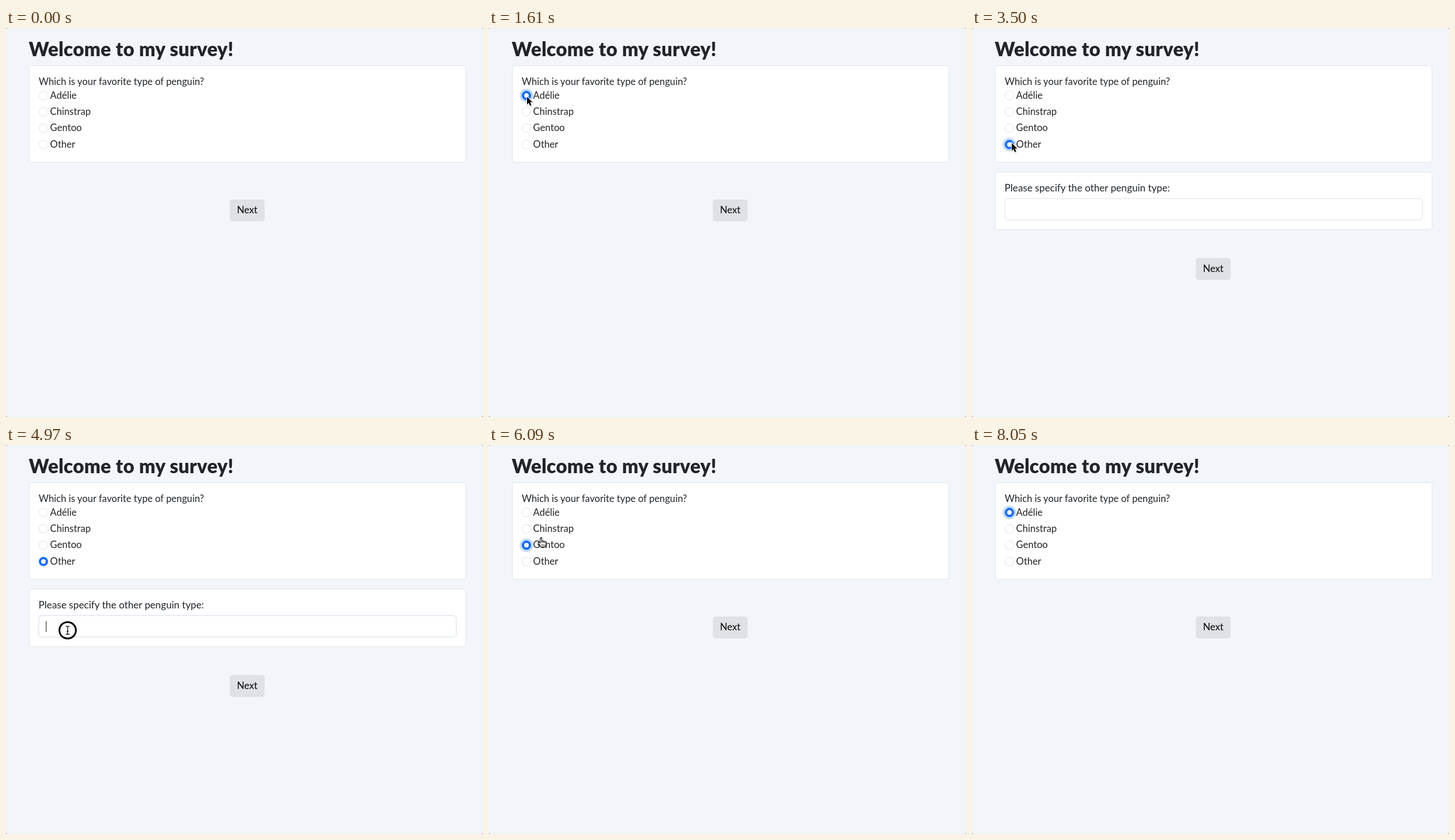
These frames come from a looping animation (828x676 px, 8.47 s). An HTML page:

```html
<!DOCTYPE html>
<html lang="en">
<head>
<meta charset="utf-8">
<title>Survey</title>
<style>
html, body { margin: 0; width: 100%; height: 100%; overflow: hidden; background: #f2f6fb; }
svg { display: block; width: 828px; height: 676px; }
text { font: 16.7px Lato, "Open Sans", sans-serif; fill: #212529; }
.title { font-size: 33.2px; font-weight: 900; letter-spacing: .3px; }
.box { fill: #fff; stroke: #dfe2e6; }
</style>
</head>
<body>
<svg viewBox="0 0 828 676">
  <rect width="828" height="676" fill="#f2f6fb"/>
  <path fill="#777" fill-rule="evenodd" d="M0 0H828V676H0ZM3 0Q0 0 0 3V673Q0 676 3 676H825Q828 676 828 673V3Q828 0 825 0Z"/>
  <text class="title" x="39.5" y="48.5">Welcome to my survey!</text>
  <rect class="box" x="40.5" y="65.5" width="758" height="168" rx="4"/>
  <text x="56.7" y="98.7">Which is your favorite type of penguin?</text>
  <g id="radios"></g>
  <g id="panel">
    <rect class="box" x="40.5" y="250.5" width="758" height="100" rx="4"/>
    <text x="56.5" y="284" style="font-size:17.2px">Please specify the other penguin type:</text>
    <rect id="glow" x="55" y="294.5" width="728.5" height="41" rx="7" fill="none" stroke="#c2dbfe" stroke-width="4"/>
    <rect class="box" x="57" y="296.5" width="724.5" height="37" rx="5"/>
    <rect id="edge" x="57" y="296.5" width="724.5" height="37" rx="5" fill="none" stroke="#86b7fe"/>
    <path id="caret" d="M69.7 306V325" stroke="#212529" stroke-width="1.1"/>
  </g>
  <g id="next">
    <rect x="388.5" y="298" width="60.5" height="38" rx="5" fill="#dee2e6"/>
    <text x="418.7" y="322" text-anchor="middle" style="fill:#000">Next</text>
  </g>
  <g id="pointer">
    <circle id="press" fill="none" stroke="#000" stroke-width="3"/>
    <g id="arrow">
      <path d="M0 1V14.5L3.2 11.6 5.4 16.6 8 15.5 5.8 10.6H10Z" opacity=".18" stroke="#000" stroke-width="2"/>
      <path d="M0 0V13.4L3 10.5 5.2 15.5 7.7 14.4 5.5 9.6H9.5Z" stroke="#fff" stroke-width="2" paint-order="stroke"/>
    </g>
    <g id="hand" fill="#fff" stroke="#000" stroke-width="1.2" stroke-linejoin="round">
      <path d="M-1.5 9V.9A1.4 1.4 0 0 1 1.3 .9V6Q2.8 4.4 4 6.3 5.6 5.2 6.6 7 9 6.2 9 8.7L8.6 12Q7.4 14 7.3 16H-.6Q-1.6 13-5 9.7-5.8 7.4-3.5 7.6Z"/>
      <path d="M1.3 6V9M4 6.5V9M6.6 7V9.4M1.2 11.2V14M3.4 11.2V14M5.6 11.2V14" stroke-width=".9"/>
    </g>
    <path id="beam" d="M-3.4-7.2Q-.4-7.2 0-5.4 .4-7.2 3.4-7.2M-3.4 7.2Q-.4 7.2 0 5.4 .4 7.2 3.4 7.2M0-5.4V5.4M-1.7 1.8H1.7" fill="none" stroke="#000" stroke-width="1.2"/>
  </g>
</svg>
<script>
const LOOP = 8470, STEP = 70, ENTER = 140, LEAVE = 8050;
const FADE = 210, GLOW = 150, LAG = 70;
const OTHER = 3, FIELD = "field";

const $ = id => document.getElementById(id);
const clamp = v => Math.max(0, Math.min(1, v));
const show = (el, on) => el.setAttribute("display", on ? "inline" : "none");
const out = power => u => 1 - (1 - u) ** power;
const smooth = u => u * u * (3 - 2 * u);

const origin = { x: 391, y: 593 };
const moves = [
  { from: ENTER, to: 1260, x: 66, y: 119.5, ease: out(3), bend: 36 },
  { from: 2450, to: 3010, x: 69, y: 200, ease: out(2) },
  { from: 3570, to: 4340, x: 88, y: 342, ease: smooth },
  { from: 4480, to: 4900, x: 107, y: 322, ease: out(2) },
  { from: 5180, to: 5530, x: 91, y: 173, ease: out(3) },
  { from: 5880, to: 6650, x: 88, y: 109, ease: smooth },
  { from: 7000, to: LEAVE, x: 450, y: 672, ease: out(2), bend: -85 }
];

const clicks = [
  { down: 1260, up: 1470, on: 0 },
  { down: 1750, up: 2030, on: 0 },
  { down: 3080, up: 3360, on: OTHER },
  { down: 4960, up: 5180, on: FIELD },
  { down: 5530, up: 5670, on: 2 },
  { down: 6580, up: 6790, on: 0 }
];
const typing = clicks.find(c => c.on === FIELD);
const blur = clicks[clicks.indexOf(typing) + 1].down;

const focusAt = t => clicks.findLast(c => c.down <= t)?.on;
const checkedAt = t => clicks.findLast(c => c.up <= t && c.on !== FIELD)?.on;

const radios = ["Adélie", "Chinstrap", "Gentoo", "Other"].map((label, i) => {
  const y = 117.3 + i * 28.4;
  $("radios").insertAdjacentHTML("beforeend", `<g>
    <circle cx="65" cy="${y}" r="11.8" fill="#c2dbfe"/>
    <circle cx="65" cy="${y}" r="7.6"/>
    <circle cx="65" cy="${y}" r="4" fill="#fff"/>
    <text x="76.6" y="${y + 5.2}">${label}</text></g>`);
  return $("radios").lastElementChild.children;
});

// Each move starts where the last one ended; bend bows it sideways.
function place(t) {
  let { x, y } = origin;
  for (const m of moves) {
    if (t < m.from) break;
    const k = m.ease(clamp((t - m.from) / (m.to - m.from)));
    const dx = m.x - x, dy = m.y - y;
    const bow = (m.bend || 0) * 4 * k * (1 - k) / Math.hypot(dx, dy);
    x += dx * k - dy * bow;
    y += dy * k + dx * bow;
  }
  return { x, y };
}

function pressAlpha(t) {
  const c = clicks.findLast(c => c.down <= t);
  if (!c) return 0;
  return t < c.up ? 1 : clamp(1 - (t - c.up + STEP) / FADE);
}

function drawRadios(t) {
  const focus = focusAt(t), checked = checkedAt(t);
  radios.forEach(([ring, disc, dot], i) => {
    const on = i === checked;
    show(ring, i === focus);
    show(dot, on);
    disc.setAttribute("fill", on ? "#176cf0" : "#fff");
    disc.setAttribute("stroke", on ? "#176cf0" : i === focus ? "#86b7fe" : "#dee2e6");
  });
}

function drawPanel(t, open) {
  show($("panel"), open);
  $("next").setAttribute("transform", `translate(0 ${open ? 101.7 : 0})`);
  const lit = clamp((t - typing.down) / GLOW) - clamp((t - blur) / GLOW);
  for (const id of ["glow", "edge"]) $(id).setAttribute("opacity", lit);
  show($("caret"), focusAt(t) === FIELD && (t - typing.down) % 1000 < 500);
}

function drawPointer(t, open) {
  show($("pointer"), t >= ENTER && t < LEAVE);
  const { x, y } = place(t);
  const kind = open && y > 296 && y < 334 ? "beam"
    : t > typing.up && x < 150 && y < 200 ? "hand" : "arrow";
  for (const id of ["arrow", "hand", "beam"]) show($(id), id === kind);
  $("pointer").setAttribute("transform", `translate(${x} ${y})`);
  $("press").setAttribute("r", kind === "beam" ? 14.3 : 19.5);
  $("press").setAttribute("opacity", pressAlpha(t));
}

function draw(now) {
  const t = Math.floor(now % LOOP / STEP) * STEP;
  const open = checkedAt(t - LAG) === OTHER;
  drawRadios(t);
  drawPanel(t, open);
  drawPointer(t, open);
}

let start;
function tick(now) {
  start ??= now;
  draw(now - start);
  requestAnimationFrame(tick);
}
draw(0);
requestAnimationFrame(tick);
</script>
</body>
</html>
```
